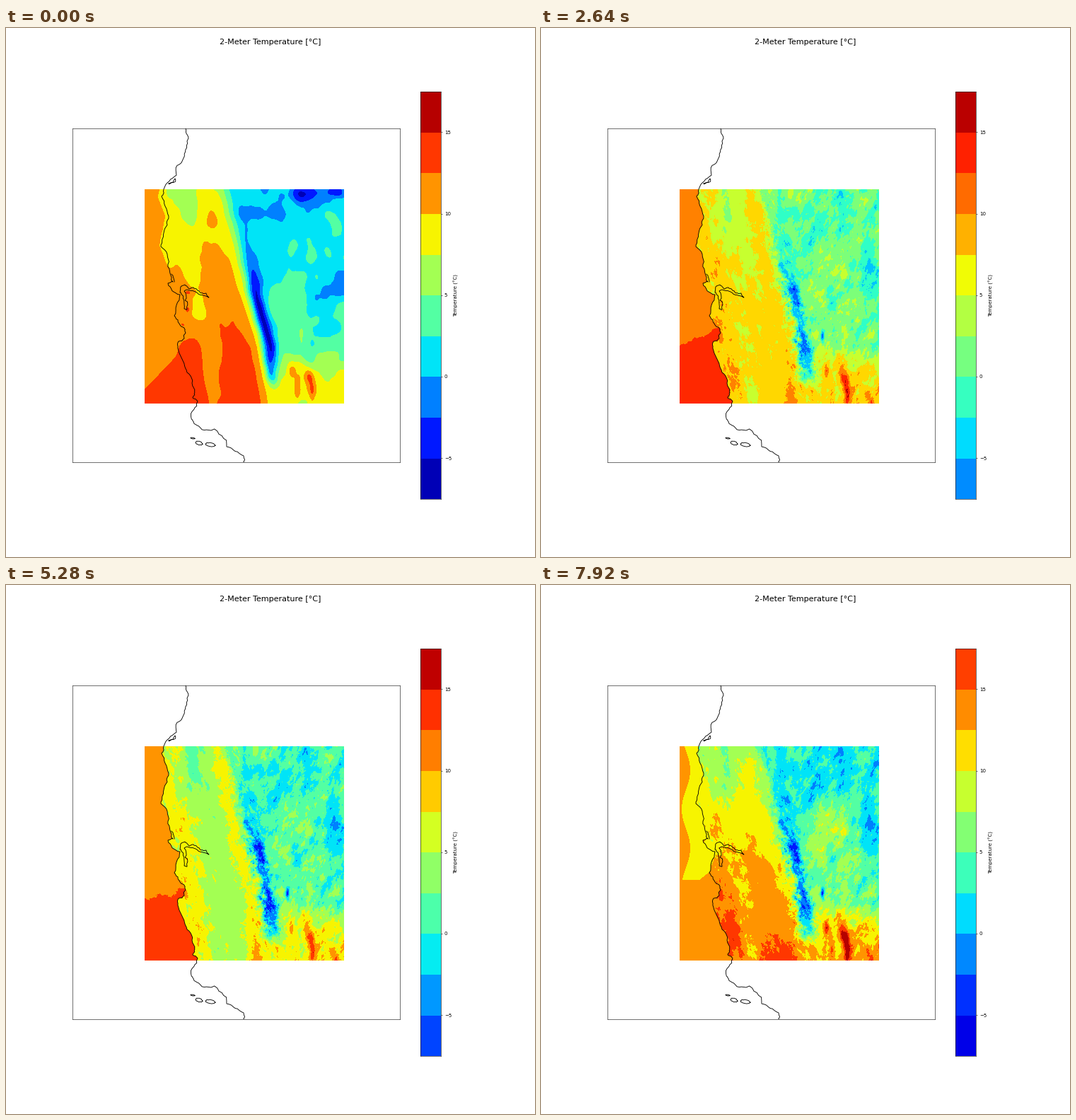
Animation of 748x748 px, one loop 8.25 s. Source, as a matplotlib script:

```python
import numpy as np
import matplotlib.pyplot as plt
from matplotlib.animation import FuncAnimation
from matplotlib.path import Path

SIZE, DPI = 748, 50
FRAMES, INTERVAL = 25, 330
X0, X1, Y0, Y1 = 196, 478, 228, 531
W, H = X1 - X0, Y1 - Y0
X, Y = np.meshgrid(np.arange(X0, X1) + 0.5, np.arange(Y0, Y1) + 0.5)
Q = (Y - Y0) / H  # 0 at the north edge, 1 at the south edge
jet = plt.get_cmap("jet")

COAST = [(254, 142), (256, 160), (251, 184), (241, 208), (223, 228), (220, 238),
         (230, 266), (223, 290), (219, 309), (229, 334), (236, 359), (229, 361),
         (246, 377), (238, 407), (250, 423), (254, 431), (252, 439), (244, 443),
         (246, 462), (256, 487), (267, 512), (264, 522), (271, 528), (262, 552),
         (267, 560), (290, 569), (312, 592), (336, 605), (337, 616)]
BAY = [(246, 374), (247, 366), (253, 363), (259, 369), (270, 370), (283, 375),
       (287, 381), (268, 373), (252, 372), (256, 398), (252, 397), (247, 374)]
SPIT = [(230, 220), (239, 213), (238, 218), (230, 220)]
POINT = [(234, 348), (238, 359)]
ISLES = [(264, 580, 3, 1), (273, 587, 5, 3), (289, 589, 7, 3)]


# ------------------------------------------------------------------ helpers
def roughen(points, seed, levels=3):
    """Midpoint displacement: each pass halves the segments and the jitter."""
    rng = np.random.default_rng(seed)
    p = np.array(points, float)
    for _ in range(levels):
        step = np.diff(p, axis=0)
        normal = step[:, ::-1] * (-1, 1)
        mid = p[:-1] + step / 2 + normal * rng.normal(0, 0.1, (len(step), 1))
        p = np.insert(p, range(1, len(p)), mid, axis=0)
    return p


def isle(x, y, rx, ry):
    a = np.linspace(0, 2 * np.pi, 9)
    return np.column_stack([x + rx * np.cos(a), y + ry * np.sin(a + 0.4)])


def sigmoid(t):
    return 1 / (1 + np.exp(-np.clip(t, -40, 40)))


def bell(t):
    return np.exp(-t ** 2)


def blob(x, y, rx, ry):
    return bell((X - x) / rx) * bell((Y - y) / ry)


def noise(seed, decay, lean=0.0, stretch=1.0, cut=1e9):
    """Fractal noise drawn out along the direction (lean, 1)."""
    kx, ky = np.meshgrid(np.fft.fftfreq(W) * W, np.fft.fftfreq(H) * H)
    n = np.hypot(lean, 1)
    along, side = (kx * lean + ky) / n, (kx - ky * lean) / n
    k2 = (stretch * along) ** 2 + side ** 2
    spec = (k2 + 50) ** (-decay / 2) * bell(np.sqrt(k2) / cut)
    white = np.random.default_rng(seed).normal(size=(H, W))
    f = np.fft.ifft2(np.fft.fft2(white) * spec).real
    return (f - f.mean()) / f.std()


# ------------------------------------------------------------------ terrain
shore = roughen(COAST, 4)
sea = Path(np.vstack([shore, [(0, 616), (0, 142)]])).contains_points(
    np.column_stack([X.ravel(), Y.ravel()])).reshape(H, W)
inland = X - np.interp(Y, [y for _, y in COAST], [x for x, _ in COAST])
crest = X - np.interp(Y, [228, 300, 370, 450, 531], [325, 340, 353, 374, 379])

west = noise(11, 1.6, 0.4, 2.0)
east = noise(23, 1.6, -0.45, 1.9)
lee = sigmoid((crest - 16) / 5)
relief = ((1 - lee) * west + lee * east) * (
    0.4 + 0.8 * bell((inland - 18) / 25) + 1.2 * sigmoid((crest + 18) / 5))
rugged = crest + 3.5 * noise(31, 1.3)

cold = (2.6 * blob(368, 263, 44, 11) + 4.5 * blob(425, 236, 22, 12)
        + 5 * blob(466, 231, 12, 9))
hot = (8 * blob(404, 485, 5, 9) + 7 * blob(412, 515, 4, 15)
       + 10 * blob(428, 493, 6, 11) + 9 * blob(433, 514, 5, 18))


def land(u, north, south, valley, coastal, base, rise, mid, heat, chill):
    """Coast ranges and valley, a steep drop at the crest, then the basin."""
    plain = (north + (south - north) * Q ** 0.8
             + valley * bell((u + 52) / 24)
             - 0.8 * min(valley, 0) * bell((u + 25) / 12)
             - 2.3 * Q * bell((u + 86) / 13)
             + coastal * blob(264, 475, 20, 55)
             - 2 * blob(262, 262, 13, 28) + 1.5 * blob(296, 262, 13, 24))
    basin = (base + rise * Q + 4.5 * sigmoid((Y - 468) / 9)
             + mid * blob(408, 350, 34, 45) - 2.8 * blob(465, 375, 26, 45))
    edge = sigmoid((u + 14) / 5)
    ridge = 10 * sigmoid((Y - 362) / 22) * sigmoid((500 - Y) / 5) + 2 * sigmoid((Y - 285) / 9) * sigmoid((400 - Y) / 9)
    return ((1 - edge) * plain + edge * basin - ridge * bell(u / 10)
            + heat * hot - chill * cold)


def front(y, slope):
    """Warm water south of a straight line."""
    return np.clip(12.2 + 0.06 * (Y - y - slope * (X - X0)), 10.3, 14)


def upwelling(shift, bottom):
    """Cool water along the shore with a wavy western edge."""
    rim = 204 + shift + 6 * np.cos((Y - 262) * 2 * np.pi / 110)
    d = np.minimum(X - rim, bottom - 0.8 * np.maximum(X - 224, 0) - Y)
    return 12 - np.clip(0.1 * d, -1.5, 1.5)


def detailed(weather, ocean):
    small = (1.5 * blob(256, 395, 5, 14) - 8 * blob(398, 437, 2.5, 10))
    return np.where(sea, ocean, land(rugged, **weather) + relief + small)


AFTERNOON = dict(north=7, south=14, valley=0.7, coastal=0.8, base=0.7, rise=3.5,
                 mid=1, heat=0.45, chill=1)
EVENING = dict(north=5.5, south=9.3, valley=1, coastal=1, base=0.2, rise=1.6,
               mid=1, heat=1, chill=0.6)
DAWN = dict(north=5.7, south=7.8, valley=-2.6, coastal=0.3, base=0.9, rise=1.6,
            mid=1.3, heat=0.65, chill=0.6)
NOON = dict(north=6.3, south=15, valley=0.8, coastal=2.3, base=1.8, rise=5.5,
            mid=5, heat=0.8, chill=0.4)
LATE = dict(NOON, north=6.8, base=2, mid=4.2, heat=1)

first_sea = front(506, -1.05)
KEYS = {0: detailed(AFTERNOON, first_sea),
        3: detailed(EVENING, front(458, -0.7)),
        16: detailed(DAWN, front(447, -0.15) + 0.15 * west),
        21: detailed(NOON, upwelling(-1, 422)),
        24: detailed(LATE, upwelling(1, 417))}

# the opening state is coarse: soft shoreline, no terrain detail
smooth = noise(7, 1.2, 0.2, 1.3, cut=16)
warm_spots = 2.5 * (blob(258, 374, 7, 5) + blob(257, 398, 5, 6) + blob(245, 421, 7, 5)
                    + blob(283, 310, 4, 6) - blob(272, 403, 10, 9))
inner = sigmoid(inland / 2.5)
START = (1 - inner) * first_sea + inner * (
    land(crest + smooth, **AFTERNOON) + warm_spots
    + smooth * (0.25 + 0.5 * sigmoid((crest - 10) / 8)))


# ---------------------------------------------------------------- animation
# colour range in force from each step onwards
RANGES = {0: (-7.5, 17.5), 1: (-12, 21), 3: (-15, 18), 6: (-12, 18), 7: (-15, 18),
          9: (-12, 18), 11: (-15, 18), 16: (-12, 18), 17: (-9, 18), 18: (-9, 21),
          19: (-9, 24), 24: (-9, 21)}


def color_range(n):
    return RANGES[max(t for t in RANGES if t <= n)]


def temperature(n):
    if n == 0:
        return START
    b = min(t for t in KEYS if t >= n)
    a = max(t for t in KEYS if t < n)
    f = np.sin((n - a) / (b - a) * np.pi / 2)
    return (1 - f) * KEYS[a] + f * KEYS[b]


def render(n):
    lo, hi = color_range(n)
    step = 3 if n else 2.5
    count = round((hi - lo) / step)
    band = np.clip(np.floor((temperature(n) - lo) / step), 0, count - 1)
    return jet((band + 0.5) / count)[..., :3]


def bar_colors(n):
    lo, hi = color_range(n)
    return jet((np.arange(-6.25, 17.5, 2.5)[:, None] - lo) / (hi - lo))[..., :3]


fig = plt.figure(figsize=(SIZE / DPI, SIZE / DPI), dpi=DPI, facecolor="white")
plt.rcParams["font.family"] = "DejaVu Sans"


def pixel_axes(left, top, width, height):
    return fig.add_axes([left / SIZE, 1 - (top + height) / SIZE,
                         width / SIZE, height / SIZE])


LEFT, TOP, WIDTH, HEIGHT = 93.5, 141.74, 463.76, 472
ax = pixel_axes(LEFT, TOP, WIDTH, HEIGHT)
field = ax.imshow(render(0), extent=(X0, X1, Y1, Y0), interpolation="nearest",
                  aspect="auto")
lines = [shore, roughen(BAY, 2), roughen(SPIT, 3), roughen(POINT, 5)]
lines += [roughen(isle(*place), k, 2) for k, place in enumerate(ISLES)]
for line in lines:
    ax.plot(*line.T, color="black", lw=1.25)
ax.set(xlim=(LEFT, LEFT + WIDTH), ylim=(TOP + HEIGHT, TOP), xticks=[], yticks=[])

cax = pixel_axes(586.25, 89.76, 28.8, 575.96)
bar = cax.imshow(bar_colors(0), extent=(0, 1, -7.5, 17.5), origin="lower",
                 interpolation="nearest", aspect="auto")
cax.set(xticks=[], yticks=range(-5, 16, 5))
cax.yaxis.tick_right()
cax.yaxis.set_label_position("right")
cax.set_ylabel("Temperature (°C)")
fig.suptitle("2-Meter Temperature [°C]", fontsize=16)


def update(n):
    field.set_data(render(n))
    bar.set_data(bar_colors(n))
    return field, bar


anim = FuncAnimation(fig, update, frames=FRAMES, interval=INTERVAL,
                     repeat=True, repeat_delay=0, blit=False)
plt.show()
```
